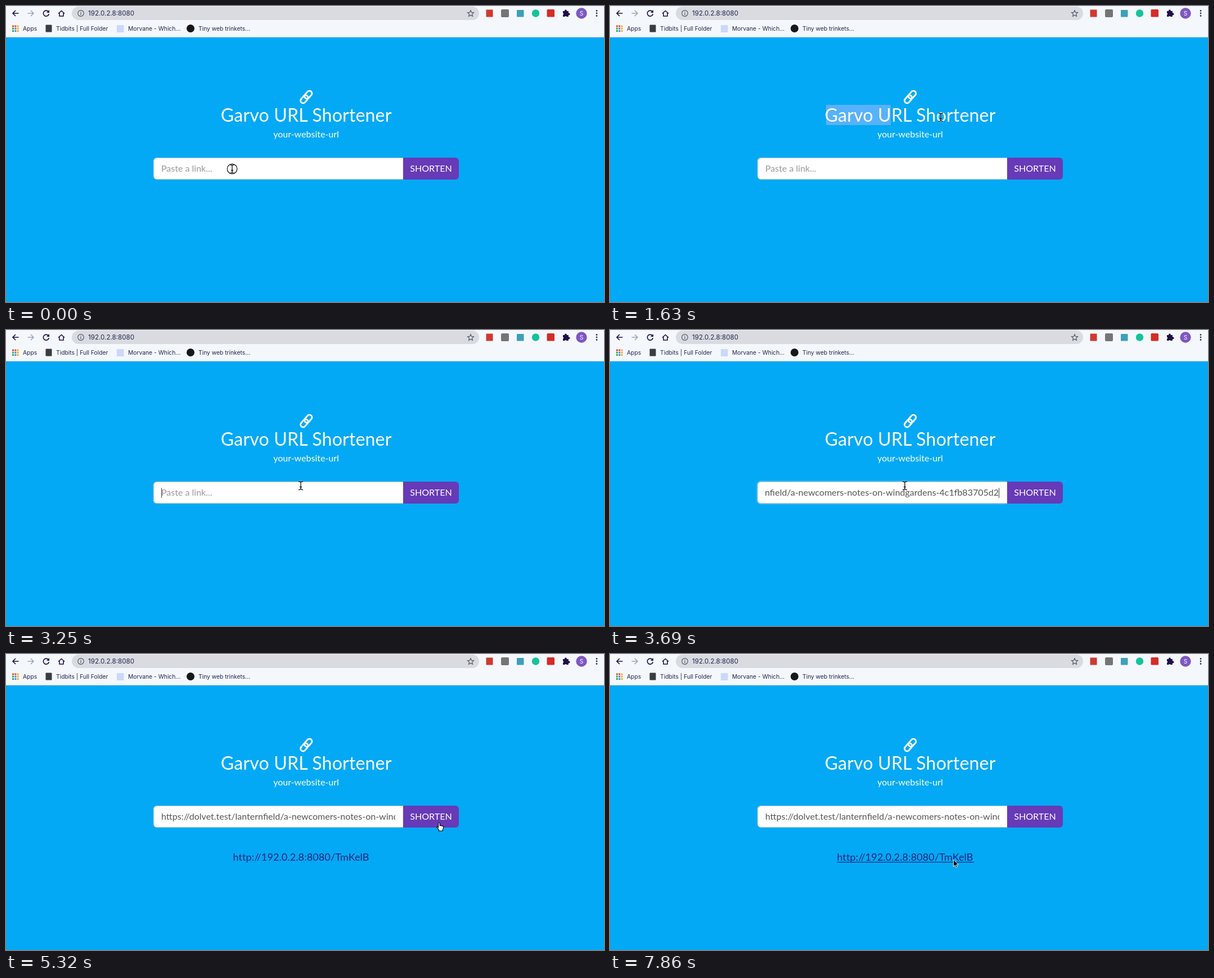
An HTML page that plays this animation: 1063 px wide and 527 px high, repeating every 8 s.

```html
<!DOCTYPE html>
<html lang="en">
<head>
<meta charset="utf-8">
<title>URL shortener</title>
<style>
html, body { margin: 0; width: 100%; height: 100%; overflow: hidden; background: #03a9f4; }
svg { display: block; width: 1063px; height: 527px; }
.page { font: 16px Lato, "Open Sans", sans-serif; }
.bar { font: 10.3px Inter, Roboto, sans-serif; fill: #24264a; }
.line { fill: none; stroke: #1f1147; stroke-width: 1.6; }
.chain rect { fill: none; stroke: #fff; stroke-width: 2.9; }
.title { font-size: 32px; letter-spacing: .2px; }
.result { font-size: 18px; letter-spacing: .1px; fill: #1a237e; }
.typed { fill: #555; }

/* every change is a hard step on one shared 8 s clock */
.anim { animation: 8s step-end infinite; }
#cursor { animation-name: move; }
#ring { animation-name: ring; }
#beam { animation-name: beam; }
#arrow { animation-name: arrow; }
#hand { animation-name: hand; }
#selection { animation-name: select; }
#hint { animation-name: hint; }
#tail { animation-name: tail; }
#head { animation-name: head; }
#caret { animation-name: caret; }
#focus { animation-name: focus; }
#result { animation-name: result; }
#underline { animation-name: underline; }

@keyframes move {
  0% { transform: translate(402px, 290px); }
  1.875% { transform: translate(396px, 289px); }
  3.75% { transform: translate(383px, 287px); }
  5.5% { transform: translate(371px, 285px); }
  11.125% { transform: translate(367px, 262px); }
  13% { transform: translate(372px, 216px); }
  14.75% { transform: translate(385px, 197px); }
  16.625% { transform: translate(402px, 196px); }
  18.5% { transform: translate(499px, 197px); }
  20.375% { transform: translate(588px, 198px); }
  22.25% { transform: translate(646px, 199px); }
  24% { transform: translate(669px, 199px); }
  25.875% { transform: translate(680px, 198px); }
  27.75% { transform: translate(683px, 197px); }
  31.5% { transform: translate(714px, 197px); }
  33.25% { transform: translate(720px, 205px); }
  35.125% { transform: translate(684px, 234px); }
  37% { transform: translate(590px, 258px); }
  38.875% { transform: translate(530px, 276px); }
  40.625% { transform: translate(524px, 277px); }
  53.625% { transform: translate(580px, 322px); }
  55.5% { transform: translate(690px, 336px); }
  57.25% { transform: translate(763px, 305px); }
  59.125% { transform: translate(771px, 300px); }
  70.25% { transform: translate(771px, 313px); }
  74% { transform: translate(748px, 347px); }
  75.875% { transform: translate(699px, 379px); }
  77.75% { transform: translate(674px, 376px); }
  79.5% { transform: translate(664px, 367px); }
  88.875% { transform: translate(632px, 367px); }
  90.75% { transform: translate(606px, 366px); }
  98.25%, 100% { transform: translate(610px, 366px); }
}
@keyframes ring { 0% { opacity: 1; } 1.875%, 100% { opacity: 0; } }
@keyframes beam {
  0%, 14.75%, 38.875% { opacity: 1; }
  11.125%, 25.875%, 53.625%, 100% { opacity: 0; }
}
@keyframes arrow {
  0%, 14.75%, 38.875%, 57.25% { opacity: 0; }
  11.125%, 25.875%, 53.625%, 70.25%, 100% { opacity: 1; }
}
@keyframes hand { 0%, 70.25%, 100% { opacity: 0; } 57.25% { opacity: 1; } }
@keyframes select {
  0% { width: 0; }
  18.5% { width: 18px; }
  20.375% { width: 115px; }
  22.25% { width: 204px; }
  24% { width: 272px; }
  25.875% { width: 300px; }
  40.625%, 100% { width: 0; }
}
@keyframes hint { 0% { opacity: 1; } 46.125%, 100% { opacity: 0; } }
@keyframes tail { 0%, 62.75%, 100% { opacity: 0; } 46.125% { opacity: 1; } }
@keyframes head { 0% { opacity: 0; } 62.75%, 100% { opacity: 1; } }
@keyframes caret {
  0%, 62.75%, 100% { opacity: 0; transform: none; }
  40.625% { opacity: 1; transform: none; }
  46.125% { opacity: 1; transform: translateX(415px); }
}
@keyframes focus { 0%, 64.625%, 100% { opacity: 0; } 40.625%, 62.75% { opacity: .35; } 42.5% { opacity: 1; } }
@keyframes result { 0% { opacity: 0; } 66.5%, 100% { opacity: 1; } }
@keyframes underline { 0% { opacity: 0; } 88.875%, 100% { opacity: 1; } }
</style>
</head>
<body>
<svg viewBox="0 0 1063 527">
  <defs>
    <clipPath id="field"><rect x="276" y="272" width="416" height="35"/></clipPath>
    <filter id="soft" x="-5%" y="-50%" width="110%" height="200%"><feGaussianBlur stdDeviation="1.8"/></filter>
    <path id="ibeam" d="M-4-7.5Q0-7.5 0-5V5Q0 7.5-4 7.5M4-7.5Q0-7.5 0-5V5Q0 7.5 4 7.5M-2 2.5H2"/>
  </defs>

  <rect width="1063" height="527" fill="#03a9f4"/>

  <g class="bar">
    <rect width="1063" height="55.5" fill="#f4f7fc"/>
    <rect y="55" width="1063" height="1" fill="#b9d3e6"/>
    <rect x="117" y="1" width="724" height="24" rx="12" fill="#d9dbe1"/>
    <g class="line">
      <path d="M22.500 13H12M17 8l-5 5 5 5"/>
      <path d="M38.500 13H49M44 8l5 5-5 5" stroke="#a5a4b8"/>
      <path d="M75.300 10A5 5 0 1 0 76.300 14"/>
      <path d="M93 13.500l5.500-5 5.500 5M95 12.500V18h7V12.500"/>
      <g stroke="#55586a" stroke-width="1.2">
        <circle cx="133" cy="13" r="5.300"/>
        <path d="M133 12.300V16M133 10v1.300"/>
        <path d="M826 7.800l1.600 3.600 3.900.4-2.900 2.600.8 3.800-3.400-2-3.400 2 .8-3.800-2.900-2.600 3.900-.4z"/>
      </g>
    </g>
    <path d="M77 7v5h-5z" fill="#1f1147"/>
    <text x="146" y="17" font-size="11.6">192.0.2.8:8080</text>

    <rect x="853.500" y="6.500" width="12" height="13" fill="#d0392f"/>
    <rect x="880" y="6" width="14" height="14" rx="2" fill="#757575"/>
    <rect x="908" y="7" width="12.500" height="12.500" rx="1" fill="#3f9fb8"/>
    <circle cx="941.500" cy="13" r="6.700" fill="#15c39a"/>
    <rect x="961.500" y="6" width="13.500" height="13.500" rx="1.500" fill="#d32d27"/>
    <path d="M990 9h3a2 2 0 1 1 3.800 0h3v3.500a2 2 0 1 1 0 3.700V19h-3.400a1.800 1.800 0 0 0-3.300 0H990v-3.200a1.800 1.800 0 0 0 0-3.400z" fill="#1f1147"/>
    <circle cx="1023" cy="13" r="9.700" fill="#7e57c2"/>
    <text x="1023" y="16.700" text-anchor="middle" fill="#fff">S</text>
    <g fill="#33344a">
      <circle cx="1050" cy="8.500" r="1.400"/><circle cx="1050" cy="13" r="1.400"/><circle cx="1050" cy="17.500" r="1.400"/>
    </g>

    <g stroke-width="3" stroke-dasharray="3 1.300" fill="none">
      <path d="M11 36H19" stroke="#ea4335"/>
      <path d="M11 40.200H14M11 44.400H14" stroke="#34a853"/>
      <path d="M15.300 40.200h3M15.300 44.400h3" stroke="#4285f4"/>
      <path d="M19.600 36h3M19.600 40.200h3M19.600 44.400h3" stroke="#fbab18"/>
    </g>
    <text x="30" y="43.700">Apps</text>
    <rect x="70.500" y="33.500" width="11" height="13" rx="1" fill="#3b3b42"/>
    <text x="89" y="43.700">Tidbits | Full Folder</text>
    <rect x="197" y="34" width="12.500" height="13" fill="#cbd8fa"/>
    <text x="217" y="43.700">Morvane - Which...</text>
    <circle cx="328" cy="40" r="7" fill="#17171b"/>
    <text x="342" y="43.700">Tiny web trinkets...</text>
  </g>

  <g class="page">
    <g class="chain" transform="translate(533.700 162) rotate(-49)">
      <rect x="-13" y="-4.500" width="15.500" height="9" rx="4.500"/>
      <rect x="-2.500" y="-4.500" width="15.500" height="9" rx="4.500"/>
    </g>
    <rect class="anim" id="selection" x="384" y="176" width="0" height="36" fill="#58b2fa"/>
    <g fill="#fff" text-anchor="middle">
      <text class="title" x="533.700" y="206">Garvo URL Shortener</text>
      <text x="533.500" y="233.500">your-website-url</text>
    </g>

    <rect class="anim" id="focus" x="261.500" y="269.500" width="446" height="40" rx="6" fill="#7cc9fa" filter="url(#soft)"/>
    <path d="M706 270.500H268a5.500 5.500 0 0 0-5.500 5.500v27a5.500 5.500 0 0 0 5.500 5.500H706z" fill="#fff" stroke="#c5cdd3"/>
    <path d="M706 270h93a6 6 0 0 1 6 6v27a6 6 0 0 1-6 6h-93z" fill="#673ab7"/>
    <text x="755.500" y="294.700" fill="#fff" text-anchor="middle">SHORTEN</text>

    <g clip-path="url(#field)">
      <text class="anim" id="hint" x="276" y="295.300" fill="#999">Paste a link...</text>
      <text class="anim typed" id="tail" x="691" y="295.300" text-anchor="end">https://dolvet.test/lanternfield/a-newcomers-notes-on-windgardens-4c1fb83705d2</text>
      <text class="anim typed" id="head" x="276" y="295.300">https://dolvet.test/lanternfield/a-newcomers-notes-on-windgardens-4c1fb83705d2</text>
    </g>
    <rect class="anim" id="caret" x="276" y="281" width="1" height="18" fill="#444"/>

    <g class="anim" id="result">
      <text class="result" x="403.500" y="368">http://192.0.2.8:8080/TmKelB</text>
      <rect class="anim" id="underline" x="404" y="370" width="243" height="1.200" fill="#1a237e"/>
    </g>
  </g>

  <g class="anim" id="cursor">
    <circle class="anim" id="ring" r="8.800" fill="#fff" stroke="#111" stroke-width="1.200"/>
    <g class="anim" id="beam" fill="none">
      <use href="#ibeam" stroke="#fff" stroke-width="2.600" opacity=".6"/>
      <use href="#ibeam" stroke="#111" stroke-width="1.300"/>
    </g>
    <path class="anim" id="arrow" d="M.500 0V12.500L3.400 9.900 5.300 14.300 7.300 13.400 5.500 9.200H9.300z" fill="#000" stroke="#fff" stroke-width=".9"/>
    <path class="anim" id="hand" d="M-2.500 9V1.500a1.300 1.300 0 0 1 2.600 0V5.500q1.500-1 2.400.4 1.500-.7 2.200.6 2-.4 2 1.600 0 3.500-1.700 5V15H-1.500V13L-5 9q-.5-2 1-1.500z" fill="#fff" stroke="#000" stroke-width="1.100"/>
  </g>
</svg>
</body>
</html>
```
